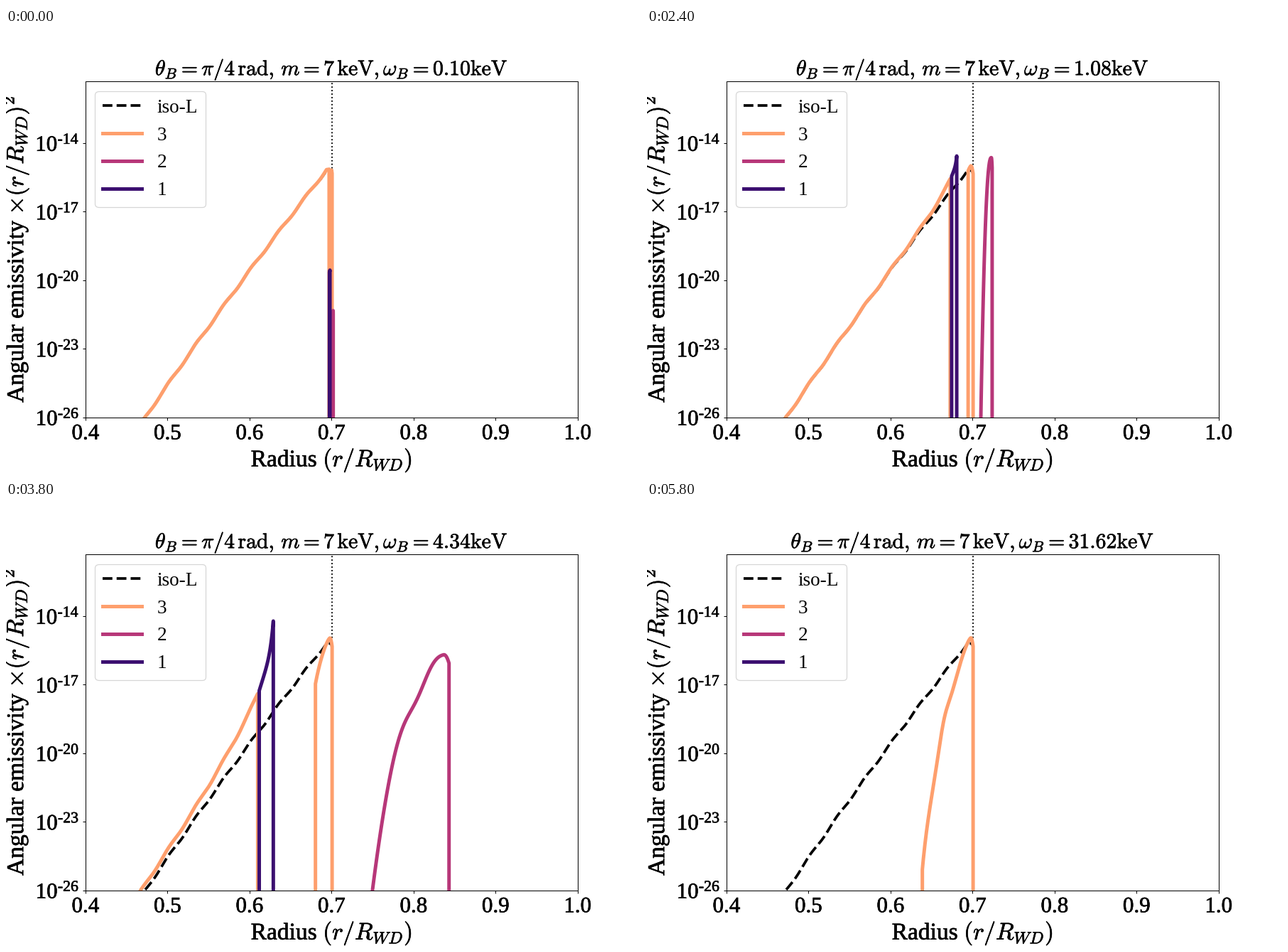
Write a matplotlib script that moves like this. It is 894 by 626 pixels and loops after 6000 ms.

```python
import numpy as np
import matplotlib.pyplot as plt
from matplotlib import patheffects
from matplotlib.animation import FuncAnimation

W, H, DPI = 894, 626, 64
K = 89.4 / DPI  # point scale of a 10 inch wide figure
N = 30
CORE, EDGE = 0.7, 0.7008
FLOOR = -30

plt.rcParams.update({"font.family": "Liberation Serif", "mathtext.fontset": "cm"})
plt.rcParams.update({key: pt * K for key, pt in {
    "axes.linewidth": 0.8, "axes.titlepad": 6, "axes.labelpad": 4,
    "axes.titlesize": 24, "axes.labelsize": 27, "legend.fontsize": 22,
    "xtick.labelsize": 25, "ytick.labelsize": 25,
    "xtick.major.size": 3.5, "ytick.major.size": 3.5,
    "xtick.major.width": 0.8, "ytick.major.width": 0.8,
    "xtick.major.pad": 3.5, "ytick.major.pad": 3.5,
    "patch.linewidth": 1.0,
}.items()})


def reach(w, rate, scale, power):
    """Distance of a resonance: linear in the field, then slower."""
    return rate * w / (1 + w / scale) ** power


def onset(w):
    """Lowers narrow peaks in the weakest fields."""
    return np.exp((0.1 - w) / 0.06)


def iso(r):
    """Unshifted log10 emissivity, with the ripple of a coarse profile."""
    t = (r - 0.473) / 0.2165
    ripple = 0.05 * np.sin(2 * np.pi * (r - 0.5267) / 0.0335)
    return np.minimum(-26 + 10.6 * t + 0.8 * t * (1 - t) + ripple, -15.2)


def walled(r, e, left=True):
    """Close a curve with vertical drops."""
    r, e = np.append(r, r[-1]), np.append(e, FLOOR)
    if left:
        r, e = np.insert(r, 0, r[0]), np.insert(e, 0, FLOOR)
    return r, e


def lower_branch(w, r, cut):
    """Mode 3 below the resonance, boosted towards the cut."""
    base = 0.0083 * w ** 2.1
    gain = 2.3 * (1 - np.exp(-w / 4))
    width = 0.008 + 0.04 * np.exp(-np.log(w / 5) ** 2 / 2.2)
    return iso(r) + base + gain * np.exp((r - cut) / width)


def upper_branch(w):
    """Mode 3 next to the core edge."""
    gap = reach(w, 0.006, 15.3, 1)
    r = np.linspace(EDGE - gap, EDGE, 100)
    d = 0.6981 - r
    fall = 461 * np.maximum(d, 0) ** 1.384 + 5e4 * np.minimum(d, 0) ** 2
    bump = 0.5 * np.exp(-((d - 0.033) / 0.008) ** 2)
    dip = 15 * gap * np.exp((r[0] - r) / 0.005)
    return walled(r, -14.95 - fall + bump - dip)


def mode3(w, cut):
    r = np.linspace(min(0.38, cut - 0.05), cut, 400)
    low = walled(r, lower_branch(w, r, cut), left=False)
    return [np.concatenate([p, [np.nan], q]) for p, q in zip(low, upper_branch(w))]


def mode2(w):
    a = CORE + 0.0094 * w * (1 + (w / 7.9) ** 2.5)
    b = CORE + 0.0215 * w * (1 + 0.57 / (1 + (2.2 / w) ** 4))
    if b > 1:
        return [], []
    u = np.linspace(0, 1, 120)
    shelf = 0.21 * np.exp(-(np.log(w / 2.92) / 0.44) ** 2)
    form = (1 - np.clip(1 - u / 0.93, 0, 1) ** 2.35
            - 8 * np.maximum(u - 0.93, 0) ** 2
            - shelf * np.exp(-((u - 0.58) / 0.2) ** 2))
    top = -14.3 - 0.31 * w - 7 * onset(w)
    return walled(a + u * (b - a), -26 + (top + 26) * form)


def mode1(w, a, cut):
    b = CORE - reach(w, 0.0182, 30, 0.809)
    foot = lower_branch(w, a, cut) - 4.5 * onset(w)
    u = np.linspace(0, 1, 60)
    rise = 4.8 * np.tanh(w / 5.8) * (0.65 * u + 0.35 * u ** 5)
    return walled(a + u * (b - a), foot + rise)


fig = plt.figure(figsize=(W / DPI, H / DPI), dpi=DPI, facecolor="white")
ax = fig.add_axes([0.125, 0.125, 0.775, 0.755])
ax.set_xlim(0.4, 1.0)
ax.set_ylim(-26, np.log10(5e-12))
ax.set_xticks(np.arange(4, 11) / 10)
exps = range(-26, -13, 3)
# U+2010 keeps the short hyphen that mathtext would turn into a minus
ax.set_yticks(list(exps), ["$\\mathdefault{10^{\u2010%d}}$" % -e for e in exps])
ax.set_xlabel(r"Radius $(r/R_{WD})$", labelpad=3 * K)
ax.set_ylabel(r"Angular emissivity $\times(r/R_{WD})^2$")
title = ax.set_title("")

bold = [patheffects.withStroke(linewidth=0.5 * K, foreground="black")]
for text in (title, ax.xaxis.label, ax.yaxis.label,
             *ax.get_xticklabels(), *ax.get_yticklabels()):
    text.set_path_effects(bold)

ax.axvline(EDGE, color="black", ls=":", lw=1.5 * K)
r = np.linspace(0.473, CORE, 300)
ax.plot(*walled(np.append(r, EDGE), np.append(iso(r), -15.4), left=False),
        "k--", lw=3 * K, label="iso-L")
modes = [ax.plot([], [], color=color, lw=4 * K, label=name)[0]
         for name, color in (("3", "#fe9f6d"), ("2", "#b73779"), ("1", "#3b0f70"))]
ax.legend(loc="upper left")


def update(i):
    w = 10 ** (-1 + 2.5 * i / (N - 1))
    title.set_text(r"$\theta_B=\pi/4\,\mathrm{rad},\,m=7\,\mathrm{keV},"
                   r"\omega_B=%.2f\mathrm{keV}$" % w)
    a = CORE - reach(w, 0.0248, 10, 0.56)
    cut = a - 0.0018 * np.tanh(2 * w)
    for line, xy in zip(modes, (mode3(w, cut), mode2(w), mode1(w, a, cut))):
        line.set_data(*xy)
    return [title, *modes]


anim = FuncAnimation(fig, update, frames=N, interval=200, repeat=True,
                     repeat_delay=0, blit=False)
plt.show()
```
